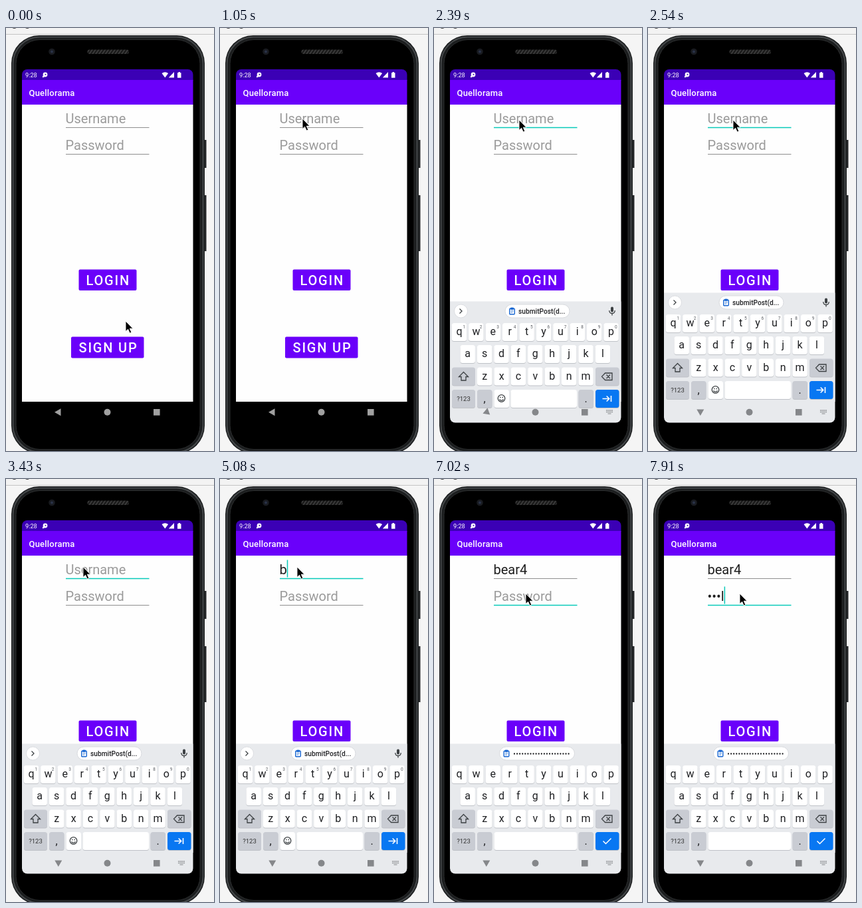
Write an HTML page that moves like this. It is 313x635 px and loops after 8000 ms.

```html
<!DOCTYPE html>
<html lang="en">
<head>
<meta charset="utf-8">
<style>
  html, body { margin: 0; height: 100%; overflow: hidden; background: #f5f5f5; }
  svg { display: block; width: 100vw; height: 100vh; font-family: Roboto, sans-serif; }
  .field { font-size: 20px; }
  .btn { font-size: 20px; font-weight: 500; letter-spacing: 1.8px; fill: #fff; }
  .key { font-size: 16px; text-anchor: middle; fill: #1f2023; }
  .num { font-size: 6.5px; text-anchor: middle; fill: #5c5f64; }
  .icon { fill: none; stroke: #3c4043; stroke-width: 1.3; }
</style>
</head>
<body>
<svg viewBox="0 0 313 635">
  <defs>
    <clipPath id="screen"><rect x="24" y="62" width="257.5" height="530.5" rx="8"/></clipPath>
    <pattern id="mesh" width="4" height="4" patternUnits="userSpaceOnUse" patternTransform="rotate(35)">
      <rect width="4" height="4" fill="#181818"/><rect width="2" height="4" fill="#3a3a3a"/>
    </pattern>
    <g id="clip">
      <rect x=".7" y="1.2" width="7.6" height="8.6" rx="1" fill="none" stroke="#1967d2" stroke-width="1.4"/>
      <path d="M2.5 0h4v2.6h-4zM2.5 4.8h4M2.5 7h2.8" fill="#1967d2" stroke="#1967d2" stroke-width=".8"/>
    </g>
  </defs>

  <rect width="313" height="9" fill="#f3f3f3"/>
  <text x="-6" y="-2" font-size="17" fill="#444">o gr g,</text>
  <path d="M0 9.5h313" stroke="#c4c4c4"/>

  <!-- phone -->
  <path d="M298 168h3.5v42H298zM298 251h3.5v84H298z" fill="#242628"/>
  <rect x="8" y="11" width="291" height="628" rx="42" fill="#1b1d1e"/>
  <rect x="10.5" y="13.5" width="286" height="623" rx="40" fill="none" stroke="#45484a" stroke-width="2"/>
  <rect x="15" y="17.5" width="277" height="615" rx="36" fill="#000" stroke="#2c2e2f"/>
  <circle cx="69" cy="35.5" r="4.8" fill="#191b20"/>
  <circle cx="69" cy="35.5" r="2" fill="#2a3348"/>
  <rect x="122.500" y="32.500" width="62.500" height="6.500" rx="3.200" fill="url(#mesh)"/>

  <g clip-path="url(#screen)">
    <rect x="24" y="62" width="258" height="17" fill="#3b00b5"/>
    <rect x="24" y="78" width="258" height="37" fill="#6a00fa"/>
    <rect x="24" y="115" width="258" height="446" fill="#fefefe"/>
    <g fill="#fff">
      <text x="29" y="74" font-size="9.2">9:28</text>
      <circle cx="59" cy="70" r="3.4"/><path d="M55 74.500v-3l3 2z"/>
      <circle cx="59.500" cy="69.800" r="1" fill="#3b00b5"/>
      <path d="M234.500 68q4.800-3.600 9.600 0l-4.800 6.500zM253 66v8.500h-8.200zM258 67.200h1.500v-1.200h2.500v1.200h1.500v7.500h-5.500z"/>
      <text x="34.500" y="102" font-size="13" font-weight="500" letter-spacing=".2">Quellorama</text>
    </g>

    <g class="field">
      <text id="name" x="89.5" y="143"/>
      <text id="pass" x="89.5" y="183"/>
    </g>
    <path id="compose" stroke="#333"/>
    <path id="nameLine" d="M90 149.500h125.500"/>
    <path id="passLine" d="M90 189.500h125.500"/>
    <rect id="nameCaret" y="121.5" width="1.5" height="26" fill="#08c9b9"/>
    <rect id="passCaret" y="161.5" width="1.5" height="26" fill="#08c9b9"/>

    <g fill="#6a00fa">
      <rect x="109.500" y="362.500" width="87" height="31.500" rx="2"/>
      <rect x="98" y="463.500" width="109.500" height="32" rx="2"/>
    </g>
    <text class="btn" x="120.500" y="386">LOGIN</text>
    <text class="btn" x="109.500" y="487">SIGN UP</text>

    <g id="board"></g>
    <g id="nav">
      <path id="back" d="M73 576.800l9.500-5.500v11z"/>
      <circle cx="152.500" cy="576.800" r="5"/>
      <rect x="222" y="572" width="9.600" height="9.600"/>
      <g id="keysIcon" fill="none" stroke="currentColor">
        <path d="M259 574h10M259 576.500h10" stroke-dasharray="1.400 .75" stroke-width="1.300"/>
        <path d="M261.500 579h5" stroke-width="1.200"/>
      </g>
    </g>
  </g>
  <path id="mouse" d="M0 0V15.500L3.600 12.200 6.200 18 8.800 16.900 6.300 11.200H11Z" fill="#000" stroke="#fff" stroke-width=".9"/>
</svg>
<script>
const $ = id => document.getElementById(id);
const GRAY = '#c9ccd3', TEAL = '#08c9b9', PITCH = 25.4;

const key = (x, y, w, fill = '#fff') =>
  `<rect x="${x}" y="${y + 1}" width="${w}" height="27" rx="3.5" fill="#bfc2c7"/>` +
  `<rect x="${x}" y="${y}" width="${w}" height="27" rx="3.5" fill="${fill}"/>`;
const label = (x, y, s, cls = 'key') => `<text class="${cls}" x="${x}" y="${y}">${s}</text>`;
const row = (letters, x, y) => [...letters].map((c, i) =>
  key(x + i * PITCH - 11.2, y, 22.4) + label(x + i * PITCH, y + 18.3, c)).join('');
const icon = (d, extra = '') => `<path class="icon" d="${d}" ${extra}/>`;
const chip = (x, w) =>
  `<rect x="${x}" y="402" width="${w}" height="20" rx="10" fill="#fff" stroke="#d9dbdf"/>` +
  `<use href="#clip" x="${x + 6}" y="407"/>`;

$('board').innerHTML =
  '<rect x="24" y="397.5" width="258" height="200" fill="#e8eaed"/>' +
  row('qwertyuiop', 38, 430) + row('asdfghjkl', 50.7, 463) + row('zxcvbnm', 76.2, 496.5) +
  key(27, 496.5, 35, GRAY) + icon('M44.500 503.500l7 7h-3.500v5.500h-7v-5.500h-3.500z') +
  key(243, 496.5, 35.5, GRAY) +
  icon('M257.500 505h10.500v10.500h-10.500l-5-5.200zM259.500 507.500l5.500 5.500m0-5.500l-5.500 5.500') +
  key(27, 530, 35, GRAY) + '<text x="44.5" y="547" font-size="9.5" text-anchor="middle" fill="#333">?123</text>' +
  key(65, 530, 22.5, GRAY) + label(76.2, 549, ',') +
  key(217.5, 530, 22.5, GRAY) + label(228.7, 549, '.') +
  key(243, 530, 35.5, '#0877f2') +
  '<g id="textMode">' +
    [...'1234567890'].map((n, i) => label(45.3 + i * PITCH, 438, n, 'num')).join('') +
    key(90.5, 530, 22.5) + key(115.5, 530, 99.5) +
    '<circle class="icon" cx="101.5" cy="543" r="5.3"/>' +
    icon('M98.500 544.500q3 3.600 6 0M99 541.500h1.500M102.500 541.500h1.500') +
    icon('M253.500 543.500h10m-3.800-4l4 4l-4 4M266.500 539v9', 'style="stroke:#fff;stroke-width:1.600"') +
    '<circle cx="40.500" cy="412" r="10" fill="#fff" stroke="#dcdee2"/>' +
    icon('M38.500 408.500l3.500 3.500l-3.500 3.500') + chip(107, 97) +
    '<text x="127" y="415.7" font-size="10.2" font-weight="500" fill="#202124">submitPost(d...</text>' +
    '<rect x="266" y="405.500" width="4" height="8" rx="2" fill="#3c4043"/>' +
    icon('M263.800 411q0 4.500 4.200 4.500t4.200-4.500M268 415.500v3') +
  '</g><g id="passMode">' + key(90.5, 530, 124.5) +
    icon('M254.500 543.500l4 4l8-8', 'style="stroke:#fff;stroke-width:1.500"') +
    '<g id="dotChip">' + chip(98.5, 113) +
    '<path d="M121 412.500h82" stroke="#202124" stroke-width="2.300" stroke-linecap="round" stroke-dasharray="0 4.080"/></g>' +
  '</g>';

// Each step changes part of the state and holds until the next.
const steps = [
  [0, { at: [180, 440], name: '', pass: '', line: 0, nameFocus: 0, passFocus: 0, nameCaret: 0, passCaret: 0,
        board: -1, mode: 0, nav: '#a0a0a0', turn: 0, hint: '#9b9b9b' }],
  [450, { at: [152, 286] }],
  [600, { at: [122, 124] }],
  [900, { at: [121, 131] }],
  [1050, { at: [124, 136] }],
  [1800, { at: [129, 138], nameFocus: 1, nameCaret: 1 }],
  [2240, { nameCaret: 0, nav: '#666' }],
  [2390, { at: [128, 138], board: 13, nav: '#85878a', turn: -20 }],
  [2540, { board: 0, turn: -90 }],
  [2980, { at: [125, 137], nameCaret: 1 }],
  [3130, { at: [120, 134] }],
  [3280, { at: [117, 132] }],
  [3430, { at: [116, 132], nameCaret: 0 }],
  [3880, { nameCaret: 1 }],
  [4330, { nameCaret: 0 }],
  [4780, { nameCaret: 1 }],
  [5080, { name: 'b' }],
  [5230, { name: 'bear', line: 32.5 }],
  [5530, { line: 39.5 }],
  [5980, { name: 'bear4', line: 50 }],
  [6130, { at: [117, 148] }],
  [6280, { at: [120, 171] }],
  [6430, { passFocus: 1, passCaret: 1, hint: '#777' }],
  [6580, { nameFocus: 0, nameCaret: 0, line: 0, hint: '#9b9b9b' }],
  [6730, { at: [128, 172], mode: 1 }],
  [6880, { at: [138, 172], mode: 2 }],
  [7020, { passCaret: 0 }],
  [7470, { pass: 'p', passCaret: 1 }],
  [7620, { pass: '•e' }],
  [7770, { pass: '••a' }],
  [7910, { pass: '•••l' }]
];

const show = (id, on) => $(id).setAttribute('visibility', on ? 'inherit' : 'hidden');
const set = (id, attrs) => Object.entries(attrs).forEach(([k, v]) => $(id).setAttribute(k, v));

function field(id, text, hint, color, focus, caret) {
  $(id).textContent = text || hint;
  set(id, { fill: text ? '#1f1f1f' : color });
  set(id + 'Line', { stroke: focus ? TEAL : '#8f8f8f', 'stroke-width': focus ? 1.6 : 1 });
  set(id + 'Caret', { x: 90 + (text ? $(id).getComputedTextLength() - .5 : 0) });
  show(id + 'Caret', caret);
}

let last = -1;
function draw() {
  const t = performance.now() % 8000;
  const past = steps.filter(s => s[0] <= t);
  if (past.length !== last) {
    last = past.length;
    const s = Object.assign({}, ...past.map(p => p[1]));
    field('name', s.name, 'Username', '#9b9b9b', s.nameFocus, s.nameCaret);
    field('pass', s.pass, 'Password', s.hint, s.passFocus, s.passCaret);
    set('compose', { d: `M90 144.500h${s.line}` });
    set('mouse', { transform: `translate(${s.at})` });
    set('board', { transform: `translate(0 ${s.board})` });
    set('nav', { fill: s.nav, color: s.nav });
    set('back', { transform: `rotate(${s.turn} 78.500 576.500)` });
    show('board', s.board >= 0);
    show('keysIcon', s.nav !== '#a0a0a0');
    show('textMode', s.mode === 0);
    show('passMode', s.mode > 0);
    show('dotChip', s.mode > 1);
  }
  requestAnimationFrame(draw);
}
draw();
</script>
</body>
</html>
```
